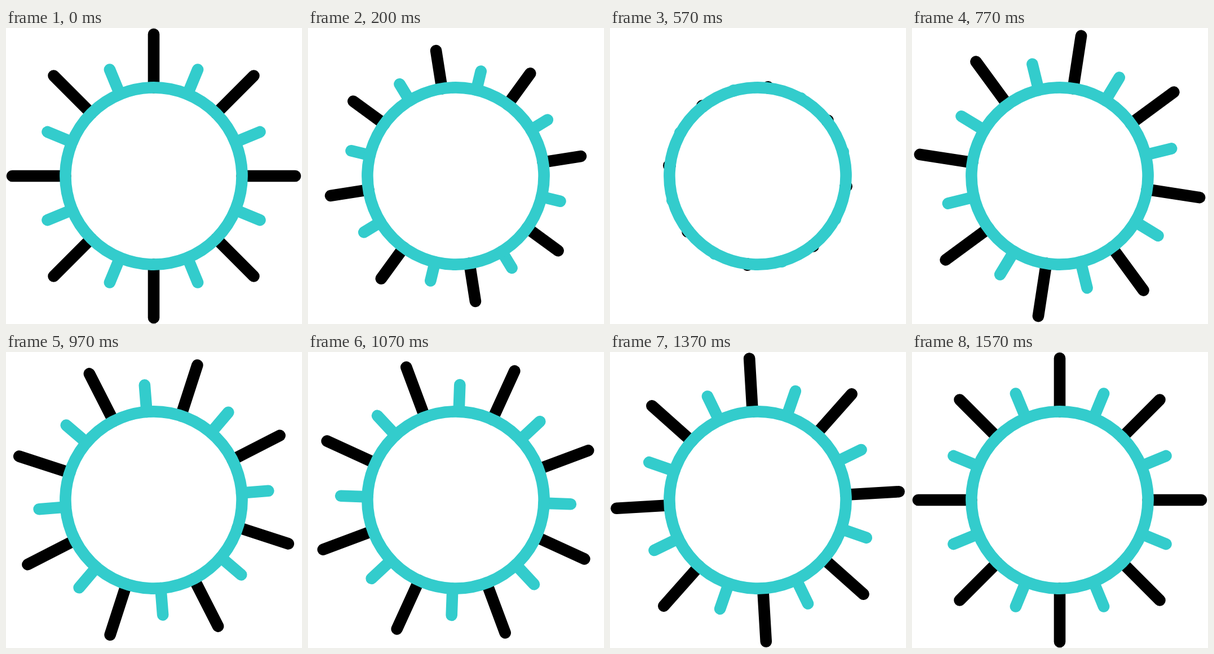
Animation of 525 by 524 pixels, one loop 1.67 s. Source, as an HTML page:

```html
<!DOCTYPE html>
<html lang="en">
<head>
<meta charset="utf-8">
<title>Sun</title>
<style>
  html, body { margin: 0; width: 100%; height: 100%; overflow: hidden; background: #fff; }
  svg { display: block; width: 100vw; height: 100vh; }
</style>
</head>
<body>
<svg viewBox="0 0 525 524" fill="none" stroke-width="20.6" stroke-linecap="round">
  <g transform="translate(262 262)">
    <g id="rays">
      <path id="long" stroke="#000"/>
      <path id="short" stroke="#3cc"/>
    </g>
    <circle r="156.6" stroke="#3cc"/>
  </g>
</svg>
<script>
const LOOP = 1670, LAST = 47, RING = 156.6;
const TURN = 18, SWING = -38.6;      // swing back, then return
const HIDDEN = 16.4, GROWN = 22;     // rays pulled in, rays fully out again
const rays = document.getElementById('rays');
const long = document.getElementById('long');
const short = document.getElementById('short');

// Cubic ease-in-out with control points (.42, 0) and (.58, 1)
function ease(x) {
  if (x <= 0) return 0;
  if (x >= 1) return 1;
  let lo = 0, hi = 1, s = x;
  for (let i = 0; i < 24; i++) {
    s = (lo + hi) / 2;
    const u = 1 - s;
    const bx = 3 * u * u * s * 0.42 + 3 * u * s * s * 0.58 + s * s * s;
    if (bx < x) lo = s; else hi = s;
  }
  return s * s * (3 - 2 * s);
}

// Rises from 0 to 1 until `peak`, then falls back to 0 at `end`
function pulse(n, peak, end) {
  return n < peak ? ease(n / peak) : 1 - ease((n - peak) / (end - peak));
}

function spokes(offset, tip) {
  let d = '';
  for (let i = 0; i < 8; i++) {
    const a = (i * 45 + offset) * Math.PI / 180;
    const x = Math.sin(a), y = -Math.cos(a);
    d += `M${x * RING} ${y * RING}L${x * tip} ${y * tip}`;
  }
  return d;
}

function draw(ms) {
  const tick = Math.floor(ms / 10) * 10;
  const n = Math.min(LAST, Math.floor((tick + 5) * 0.03));
  const out = 1 - pulse(n, HIDDEN, GROWN);
  rays.setAttribute('transform', `rotate(${SWING * pulse(n, TURN, LAST)})`);
  long.setAttribute('d', spokes(0, RING + 94.4 * out));
  short.setAttribute('d', spokes(22.5, RING + 47.4 * out));
}

const start = performance.now();
function loop(now) {
  draw(Math.max(0, now - start) % LOOP);
  requestAnimationFrame(loop);
}
draw(0);
requestAnimationFrame(loop);
</script>
</body>
</html>
```
